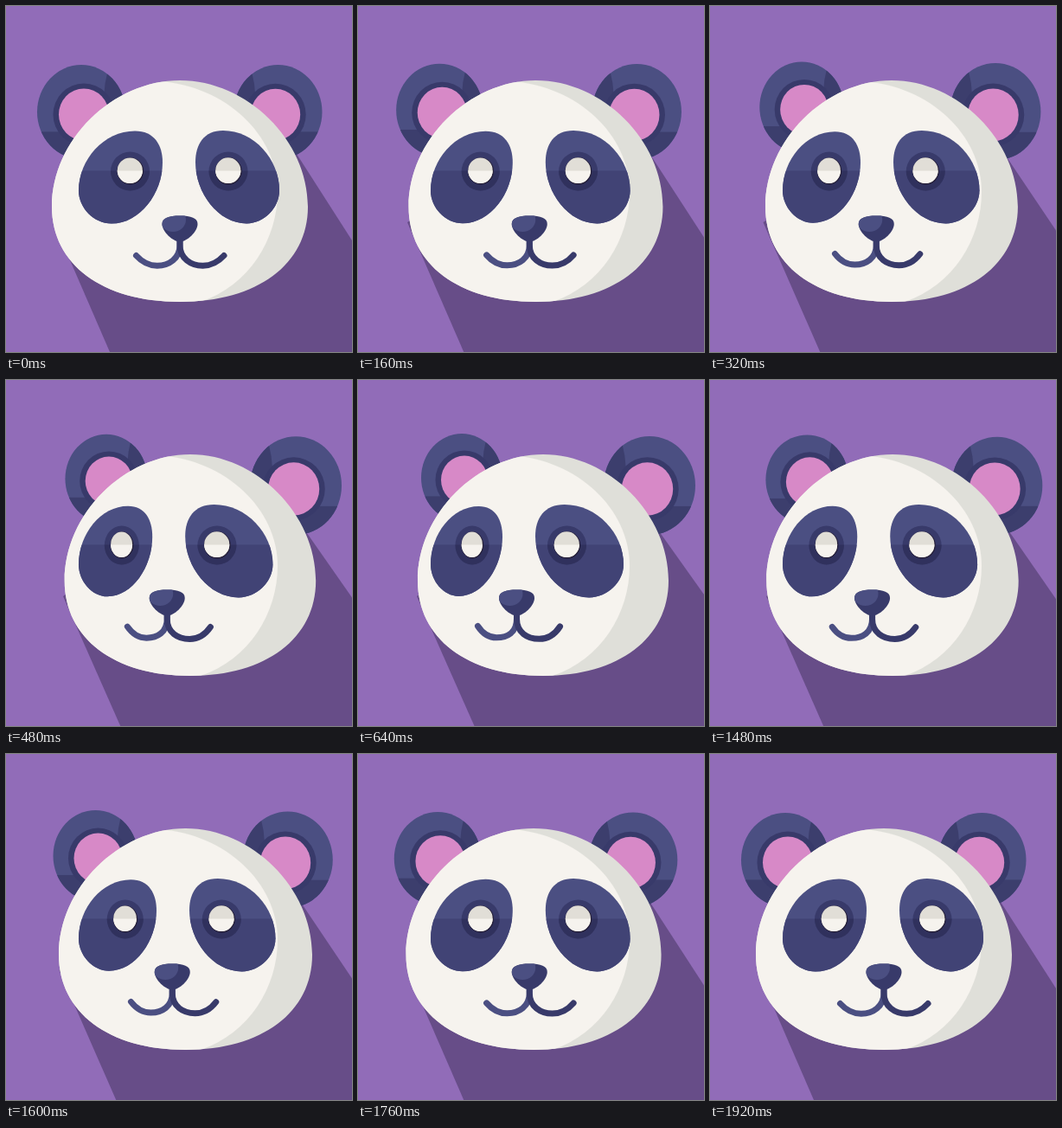
Recreate the animation shown at these times as an HTML page with a canvas. Size 400 by 400 pixels, loop 4.8 s.

```html
<!DOCTYPE html>
<html lang="en">
<head>
<meta charset="utf-8">
<title>Panda</title>
<style>
html, body { margin: 0; width: 100%; height: 100%; overflow: hidden; background: #916cb8; }
canvas { display: block; width: 100vw; height: 100vh; }
</style>
</head>
<body>
<canvas id="stage"></canvas>
<script>
const SIZE = 400, LOOP = 4800, STEP = 40, TURN = 640, BACK = 1280;
const C = {
  bg: '#916cb8', shadow: '#674d88', white: '#f6f3ee', grey: '#dfdfd9', lid: '#e1ded7',
  light: '#4b4f82', mid: '#414375', shade: '#3c3e6d', dark: '#383a6a', deep: '#30315d', pink: '#d789c7'
};
const canvas = document.getElementById('stage');
const ctx = canvas.getContext('2d');
const dpr = Math.max(1, window.devicePixelRatio || 1);
canvas.width = canvas.height = SIZE * dpr;

const mix = (a, b, p) => a + (b - a) * p;
const smooth = x => x * x * (3 - 2 * x);

// Turn amount, 0 = facing front, 1 = turned; lead < 1 lets a part run ahead.
function turn(t, lead) {
  if (t < TURN) return smooth(Math.pow(t / TURN, lead));
  if (t < BACK) return 1;
  if (t < BACK + TURN) return 1 - smooth((t - BACK) / TURN);
  return 0;
}

function poly(color, ...pts) {
  ctx.beginPath();
  for (let i = 0; i < pts.length; i += 2) ctx.lineTo(pts[i], pts[i + 1]);
  ctx.closePath();
  ctx.fillStyle = color;
  ctx.fill();
}

function ellipsePath(x, y, rx, ry) {
  ctx.beginPath();
  ctx.ellipse(x, y, rx, ry, 0, 0, Math.PI * 2);
}

function oval(color, x, y, rx, ry) {
  ellipsePath(x, y, rx, ry);
  ctx.fillStyle = color;
  ctx.fill();
}

// Fills the current path, then paints inside it.
function inside(color, paint) {
  ctx.save();
  ctx.fillStyle = color;
  ctx.fill();
  ctx.clip();
  paint();
  ctx.restore();
}

function below(color, y) {
  ctx.fillStyle = color;
  ctx.fillRect(0, y, SIZE, SIZE);
}

function drawShadow(p) {
  poly(C.shadow,
    mix(120, 134.5, p), 400, mix(55, 68, p), 250, 200, 165,
    mix(335, 341, p), mix(169.5, 165, p),
    400, mix(271, 248, p), 400, 400);
}

function ear(x, y, rx, ry, px, py, pr, side) {
  ellipsePath(x, y, rx, ry);
  inside(C.light, () => {
    const at = k => x + side * k * rx;
    poly(C.shade, at(0.63), y - ry, at(0.54), y - 0.6 * ry, at(0.48), y, at(1.1), y, at(1.1), y - ry);
    below(C.shade, y + 0.42 * ry);
  });
  oval(C.dark, px, py, pr + 6.5, pr + 7);
  oval(C.pink, px, py, pr, pr + 1);
}

function drawEars(pl, pr) {
  ear(mix(87, 120, pl), mix(122.5, 113, pl), mix(51, 47, pl), mix(54.5, 51, pl),
    mix(90, 123, pl), mix(125.5, 115.5, pl), mix(29, 27, pl), 1);
  ear(mix(314.5, 337, pr), mix(122.5, 122, pr), mix(51, 53, pr), mix(54.5, 57, pr),
    mix(311.5, 334.5, pr), mix(125.5, 126, pr), mix(28.7, 29.7, pr), -1);
}

// Half of the head outline: flatter above, fuller below.
function dome(x, y, rx, ry, round) {
  const cx = rx * round, cy = ry * round;
  ctx.lineTo(x - rx, y);
  ctx.bezierCurveTo(x - rx, y + cy, x - cx, y + ry, x, y + ry);
  ctx.bezierCurveTo(x + cx, y + ry, x + rx, y + cy, x + rx, y);
}

function drawHead(p) {
  const x = mix(201, 214, p), y = 232, r = mix(148, 145, p);
  ctx.beginPath();
  dome(x, y, r, -146, 0.526);
  dome(x, y, r, 110, 0.605);
  inside(C.grey, () => {
    ctx.beginPath();
    ctx.moveTo(0, 86);
    ctx.lineTo(176, 87);
    ctx.bezierCurveTo(255, 92, 314, 150, 314, 215);
    ctx.bezierCurveTo(314, 270, 280, 325, 222, 343);
    ctx.lineTo(0, 343);
    ctx.fillStyle = C.white;
    ctx.fill();
  });
}

// Egg-shaped patch running from its outer edge to its inner edge.
function patch(outer, inner, top, bottom) {
  const X = u => mix(outer, inner, u), Y = v => mix(top, bottom, v);
  const curve = (a, b, c, d, e, f) => ctx.bezierCurveTo(X(a), Y(b), X(c), Y(d), X(e), Y(f));
  ctx.beginPath();
  ctx.moveTo(X(0), Y(0.645));
  curve(0, 0.31, 0.3, 0, 0.67, 0);
  curve(0.9, 0, 1, 0.15, 1, 0.34);
  curve(1, 0.67, 0.73, 1, 0.39, 1);
  curve(0.18, 1, 0, 0.83, 0, 0.645);
  inside(C.light, () => below(C.mid, 190.5));
}

function eye(x, ring, ringH, rx, ry) {
  ellipsePath(x, 191, ring, ringH);
  inside(C.dark, () => below(C.deep, 190.5));
  oval('#26203a', x + 0.3, 190.8, rx + 0.4, ry + 0.4);
  ellipsePath(x - 0.2, 190.2, rx - 0.4, ry - 0.4);
  inside(C.lid, () => below(C.white, 190.5));
}

function drawEyes(p) {
  patch(84, mix(181, 167, p), mix(144.5, 146, p), mix(251.5, 250, p));
  patch(mix(316, 307, p), mix(219, 205, p), 144, 251.5);
  eye(mix(143.5, 132, p), mix(22.5, 19.5, p), 22.5, mix(15, 12.5, p), 15.2);
  eye(mix(257, 241.5, p), 22.5, 22.5, 15, 15.3);
}

function lip(color, x, end, endY, low) {
  const at = k => mix(x, end, k);
  ctx.beginPath();
  ctx.moveTo(x, 268);
  ctx.lineTo(x, 276);
  ctx.bezierCurveTo(x, 292, at(0.25), low, at(0.52), low);
  ctx.bezierCurveTo(at(0.74), low, at(0.88), low - 5, end, endY);
  ctx.strokeStyle = color;
  ctx.stroke();
}

function drawMuzzle(p) {
  const x = mix(201, 183.5, p);
  ctx.lineWidth = 7;
  ctx.lineCap = 'round';
  lip(C.light, x, mix(150.5, 138.5, p), mix(288.5, 284.5, p), mix(300.2, 297.8, p));
  lip(C.dark, x, mix(252, 233.5, p), mix(288.5, 285, p), mix(300.2, 299.3, p));

  ctx.beginPath();
  ctx.moveTo(x, 242.5);
  ctx.bezierCurveTo(x + 13, 242.5, x + 20.5, 245, x + 20.5, 252);
  ctx.bezierCurveTo(x + 20.5, 261, x + 8, 272.5, x, 272.5);
  ctx.bezierCurveTo(x - 8, 272.5, x - 20.5, 261, x - 20.5, 252);
  ctx.bezierCurveTo(x - 20.5, 245, x - 13, 242.5, x, 242.5);
  inside(C.dark, () => oval(C.light, x - 8, 247, 15, 14));
}

function frame(now) {
  const t = Math.floor((now % LOOP) / STEP) * STEP;
  const lead = turn(t, 0.67), half = turn(t, 0.86), p = turn(t, 1);
  ctx.setTransform(dpr, 0, 0, dpr, 0, 0);
  ctx.fillStyle = C.bg;
  ctx.fillRect(0, 0, SIZE, SIZE);
  drawShadow(p);
  drawEars(half, lead);
  drawHead(lead);
  drawEyes(p);
  drawMuzzle(p);
}

const start = performance.now();
function tick() {
  frame(performance.now() - start);
  requestAnimationFrame(tick);
}
tick();
</script>
</body>
</html>
```
